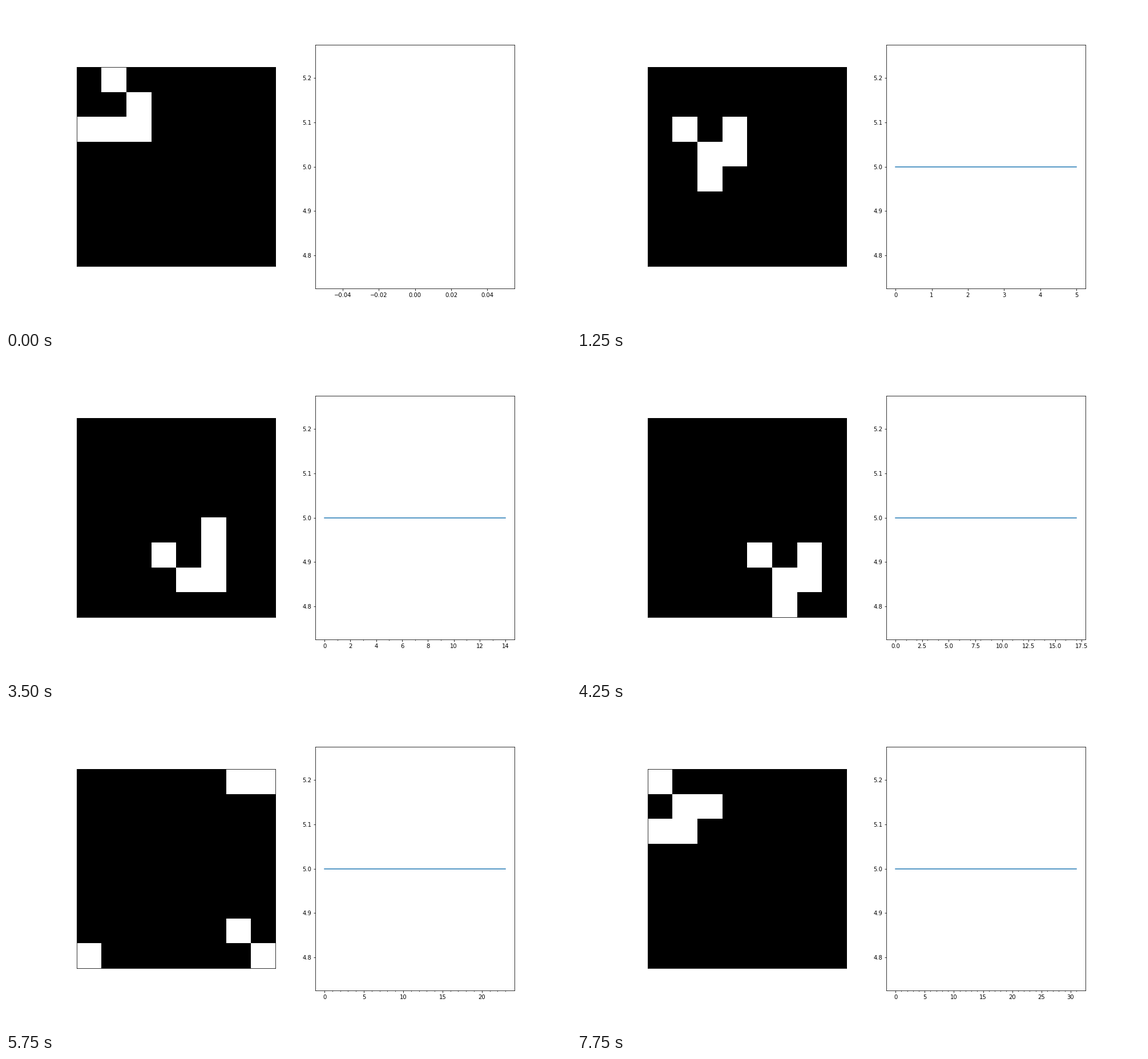
Animation of 990x566 px, one loop 8000 ms. Source, as a matplotlib script:

```python
import matplotlib.pyplot as plt
import numpy as np
from matplotlib.animation import FuncAnimation
from matplotlib.ticker import FixedLocator

WIDTH, HEIGHT, DPI = 990, 566, 72
SIZE, STEPS, INTERVAL = 8, 32, 250
GLIDER = [(0, 1), (1, 2), (2, 0), (2, 1), (2, 2)]

plt.rcParams["font.family"] = "DejaVu Sans"


def evolve(grid):
    """One Game of Life step on a torus."""
    shifts = [(r, c) for r in (-1, 0, 1) for c in (-1, 0, 1) if (r, c) != (0, 0)]
    neighbours = sum(np.roll(grid, s, axis=(0, 1)) for s in shifts)
    alive = (neighbours == 3) | ((grid == 1) & (neighbours == 2))
    return alive.astype(int)


start = np.zeros((SIZE, SIZE), dtype=int)
for cell in GLIDER:
    start[cell] = 1

grids = [start]
while len(grids) < STEPS:
    grids.append(evolve(grids[-1]))
population = [grid.sum() for grid in grids]

fig, (board, chart) = plt.subplots(
    1, 2, figsize=(WIDTH / DPI, HEIGHT / DPI), dpi=DPI, facecolor="white")
fig.subplots_adjust(left=0.125, right=0.9, bottom=0.125, top=0.88, wspace=0.2)

image = board.imshow(start, cmap="gray", vmin=0, vmax=1)
board.set_xticks([])
board.set_yticks([])
line, = chart.plot([], [], color="C0", lw=1.5)


def update(step):
    image.set_data(grids[step])
    times = range(step + 1)
    line.set_data(times, population[:step + 1])
    chart.xaxis.set_minor_locator(FixedLocator(times))
    chart.relim()
    chart.autoscale_view()
    return image, line


anim = FuncAnimation(fig, update, frames=STEPS, interval=INTERVAL,
                     repeat=True, repeat_delay=0)
plt.show()
```
